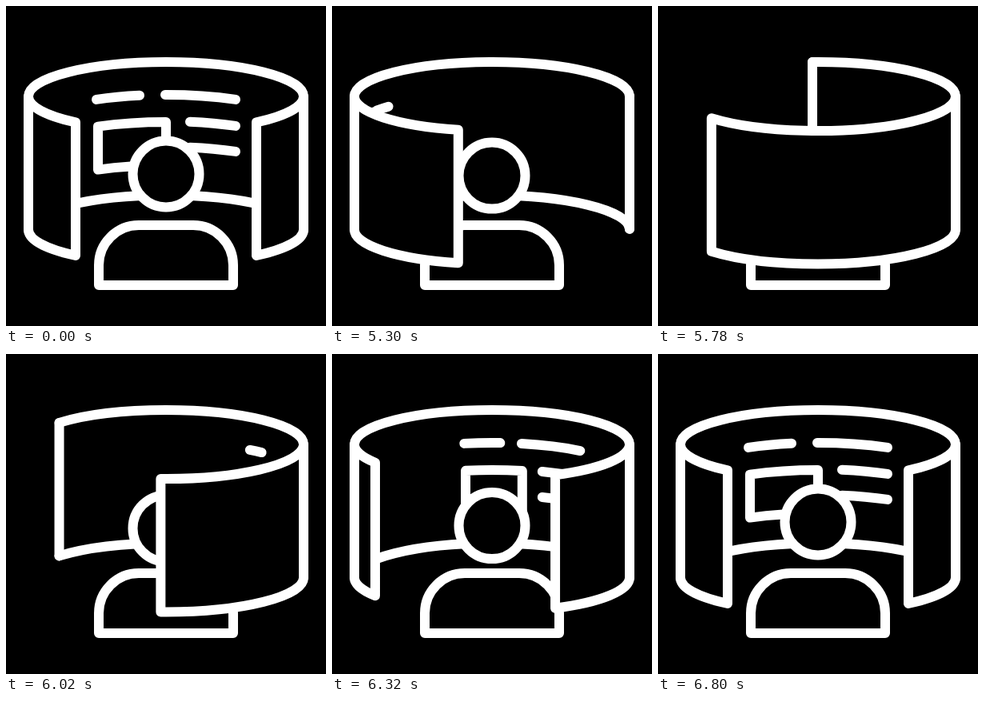
An HTML page with a canvas for the animation above (6830 ms loop, 400 px wide and 400 px high).

```html
<!DOCTYPE html>
<html lang="en">
<head>
<meta charset="utf-8">
<title>Panoramic screen</title>
<style>
  html, body { margin: 0; width: 100%; height: 100%; overflow: hidden; background: #000; }
  canvas { display: block; width: 100%; height: 100%; }
</style>
</head>
<body>
<canvas id="stage" width="400" height="400"></canvas>
<script>
const ctx = document.getElementById('stage').getContext('2d');
const LOOP = 6830;
const SPIN_START = 5080, SPIN_TIME = 1650;
const BOB_START = 5000, BOB_TIME = 1800;
const CX = 200, TOP = 113, RX = 172, RY = 43, HEIGHT = 166.5;
const HALF_GAP = 113.7;
const PAGE_LIMIT = 320;

// Arc length along the rim, measured from the front towards the right
const STEPS = 720;
const lengths = [0];
for (let i = 1; i <= STEPS; i++) {
  const a = (i - 0.5) / STEPS * 2 * Math.PI;
  lengths.push(lengths[i - 1] + Math.hypot(RX * Math.cos(a), RY * Math.sin(a)) * 2 * Math.PI / STEPS);
}
const RIM = lengths[STEPS];

function angleAt(len) {
  const turns = Math.floor(len / RIM);
  const rest = len - turns * RIM;
  let i = 1;
  while (i < STEPS && lengths[i] < rest) i++;
  const part = (rest - lengths[i - 1]) / (lengths[i] - lengths[i - 1]);
  return 2 * Math.PI * (turns + (i - 1 + part) / STEPS);
}

const clamp = (v, lo, hi) => Math.max(lo, Math.min(hi, v));

function bezier(x1, y1, x2, y2) {
  const at = (p, q, t) => 3 * p * t * (1 - t) ** 2 + 3 * q * t * t * (1 - t) + t ** 3;
  return x => {
    if (x <= 0) return 0;
    if (x >= 1) return 1;
    let lo = 0, hi = 1;
    for (let i = 0; i < 30; i++) {
      const mid = (lo + hi) / 2;
      if (at(x1, x2, mid) < x) lo = mid; else hi = mid;
    }
    return at(y1, y2, lo);
  };
}
const spinEase = bezier(0.27, 0, 0.28, 1);

function rim(y, from, to, reverse = false) {
  ctx.ellipse(CX, y, RX, RY, 0, Math.PI / 2 - from, Math.PI / 2 - to, !reverse);
}

function shape(draw, filled) {
  ctx.beginPath();
  draw();
  if (filled) ctx.fill();
  ctx.stroke();
}

// Split the screen where it turns from the front to the back
function screenParts(shift) {
  const from = angleAt(HALF_GAP + shift);
  const to = angleAt(RIM - HALF_GAP + shift);
  const cuts = [from];
  for (let a = Math.PI / 2; a < to; a += Math.PI) if (a > from) cuts.push(a);
  cuts.push(to);
  return cuts.slice(1).map((end, i) => ({
    from: cuts[i],
    to: end,
    front: Math.cos((cuts[i] + end) / 2) > 0,
    edges: [from, to].filter(e => e === cuts[i] || e === end)
  }));
}

function drawBack(part) {
  shape(() => rim(TOP, part.from, part.to));
  shape(() => rim(TOP + HEIGHT, part.from, part.to));
  for (const e of part.edges) {
    const x = CX + RX * Math.sin(e), y = TOP + RY * Math.cos(e);
    shape(() => { ctx.moveTo(x, y); ctx.lineTo(x, y + HEIGHT); });
  }
}

function drawFront(part) {
  shape(() => {
    rim(TOP, part.from, part.to);
    rim(TOP + HEIGHT, part.to, part.from, true);
    ctx.closePath();
  }, true);
}

// How far the page on the inner wall has slid sideways
function slideAt(t) {
  if (t < 5007 || t >= 6700) return 0;
  if (t < 5345) return -0.49 * (t - 5007);
  return 168 * Math.min(1, ((6700 - t) / 771) ** 2.1);
}

function drawPage(slide) {
  const k = 1 - (Math.abs(slide) / 168) ** 1.2;
  if (k < 0.02) return;
  const place = x => CX + slide + k * (x - CX);
  const theta = x => -Math.acos(clamp((Math.min(place(x), PAGE_LIMIT) - CX) / RX, -1, 1));
  const arc = (y, a, b, back) => ctx.ellipse(CX, y, RX, RY, 0, theta(a), theta(b), back);
  const rows = [[154, 113, 167], [154, 199, 287], [187, 230, 287], [219, 230, 287]];
  for (const [y, a, b] of rows) {
    if (place(a) < PAGE_LIMIT) shape(() => arc(y, a, b, false));
  }
  shape(() => {
    arc(188, 115, 200, false);
    arc(242, 200, 115, true);
    ctx.closePath();
  });
}

function drawPerson(t) {
  const u = clamp((t - BOB_START) / BOB_TIME, 0, 1);
  const bob = 8.3 * Math.sin(Math.PI * u) ** 2;
  shape(() => ctx.arc(200, 210 + bob, 41.5, 0, 2 * Math.PI), true);
  shape(() => {
    ctx.moveTo(116, 349);
    ctx.lineTo(116, 324);
    ctx.arc(166, 324, 50, Math.PI, 1.5 * Math.PI);
    ctx.arc(234, 324, 50, 1.5 * Math.PI, 2 * Math.PI);
    ctx.lineTo(284, 349);
    ctx.closePath();
  }, true);
}

function render(t) {
  ctx.fillStyle = '#000';
  ctx.fillRect(0, 0, 400, 400);
  ctx.strokeStyle = '#fff';
  ctx.lineWidth = 12;
  ctx.lineCap = ctx.lineJoin = 'round';

  const parts = screenParts(RIM * spinEase((t - SPIN_START) / SPIN_TIME));
  parts.filter(p => !p.front).forEach(drawBack);
  drawPage(slideAt(t));
  drawPerson(t);
  parts.filter(p => p.front).forEach(drawFront);
}

const begin = performance.now();
function tick() {
  render((performance.now() - begin) % LOOP);
  requestAnimationFrame(tick);
}
tick();
</script>
</body>
</html>
```
